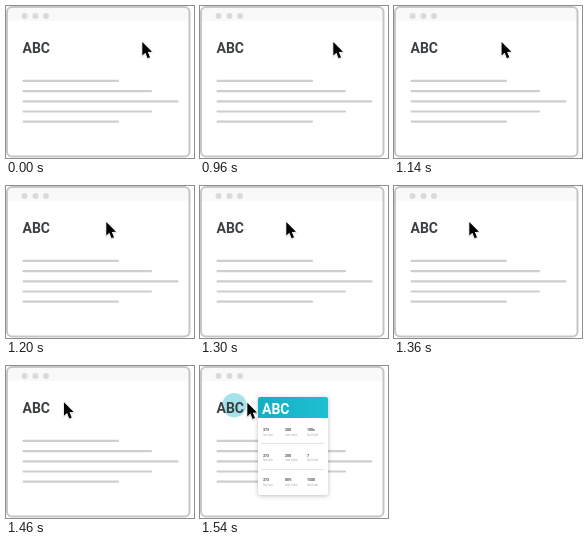
Write an HTML page with a canvas that moves like this. It is 188 px wide and 152 px high and loops after 2700 ms.

```html
<!DOCTYPE html>
<html lang="en">
<head>
<meta charset="utf-8">
<style>
  html, body { margin: 0; width: 100%; height: 100%; overflow: hidden; background: #fff; }
  canvas { display: block; width: 188px; height: 152px; }
</style>
</head>
<body>
<canvas id="stage"></canvas>
<script>
const W = 188, H = 152, LOOP = 2700, POPUP_AT = 1480;
const canvas = document.getElementById('stage');
const ctx = canvas.getContext('2d');
const dpr = window.devicePixelRatio || 1;
canvas.width = W * dpr;
canvas.height = H * dpr;

// Cursor tip: [time, x, y]
const path = [
  [940, 136, 36], [960, 133, 36], [1060, 117, 36], [1200, 100, 36],
  [1300, 86, 36], [1420, 64, 36], [1480, 54.5, 36.3], [1540, 47, 36.8]
];

function cursorAt(t) {
  if (t < 960) return path[0].slice(1);
  for (let i = 1; i < path.length; i++) {
    const [t0, x0, y0] = path[i - 1], [t1, x1, y1] = path[i];
    if (t <= t1) {
      const k = (t - t0) / (t1 - t0);
      return [x0 + (x1 - x0) * k, y0 + (y1 - y0) * k];
    }
  }
  return path[path.length - 1].slice(1);
}

function rounded(x, y, w, h, r) {
  ctx.beginPath();
  ctx.roundRect(x, y, w, h, r);
}

function disc(x, y, r, color) {
  ctx.fillStyle = color;
  ctx.beginPath();
  ctx.arc(x, y, r, 0, Math.PI * 2);
  ctx.fill();
}

function label(str, x, y, size, color, weight = 700) {
  ctx.font = `${weight} ${size}px Roboto, Arial, sans-serif`;
  ctx.fillStyle = color;
  ctx.fillText(str, x, y);
}

function drawWindow() {
  rounded(1, 1, 182.5, 149.5, 5);
  ctx.fillStyle = '#fff';
  ctx.fill();
  ctx.save();
  ctx.clip();
  ctx.fillStyle = '#f9f9f9';
  ctx.fillRect(0, 0, W, 15);
  ctx.restore();
  ctx.strokeStyle = '#c6c6c6';
  ctx.lineWidth = 2;
  ctx.stroke();
  for (const x of [18.5, 29.5, 40]) disc(x, 10, 3, '#dadada');
  ctx.fillStyle = '#cecece';
  [113, 146, 172.5, 146, 113].forEach((end, i) => {
    rounded(16.5, 73.8 + i * 10.2, end - 16.5, 2.2, 1);
    ctx.fill();
  });
}

function drawPopup() {
  ctx.save();
  ctx.shadowColor = 'rgba(0,0,0,.25)';
  ctx.shadowBlur = 4 * dpr;
  ctx.shadowOffsetY = dpr;
  rounded(58, 31, 70, 98, 2);
  ctx.fillStyle = '#fff';
  ctx.fill();
  ctx.restore();

  const teal = ctx.createLinearGradient(58, 0, 128, 0);
  teal.addColorStop(0, '#12b0c3');
  teal.addColorStop(1, '#1fc0d2');
  rounded(58, 31, 70, 21, [2, 2, 0, 0]);
  ctx.fillStyle = teal;
  ctx.fill();
  label('ABC', 62, 48.3, 14, '#fff');

  ctx.fillStyle = '#dedede';
  for (const y of [77, 103]) ctx.fillRect(61, y, 63, 0.8);
  const heads = [['373', '200', '100x'], ['373', '200', '7'], ['373', '80%', '1500']];
  const notes = ['low rate', 'new value', 'last total'];
  [65, 90.5, 115].forEach((y, row) => {
    [63, 85, 107].forEach((x, col) => {
      label(heads[row][col], x, y, 3.5, '#444');
      label(notes[col], x, y + 4.8, 2.8, '#aaa', 400);
    });
  });
}

function drawCursor(x, y) {
  ctx.save();
  ctx.translate(x, y);
  ctx.beginPath();
  ctx.moveTo(0.3, 0);
  for (const [px, py] of [[0.3, 13.6], [3.4, 10.8], [5.6, 16.2], [8, 15.2], [5.8, 10], [10, 9.8]]) {
    ctx.lineTo(px, py);
  }
  ctx.closePath();
  ctx.lineJoin = 'round';
  ctx.shadowColor = 'rgba(0,0,0,.25)';
  ctx.shadowBlur = dpr;
  ctx.shadowOffsetY = 0.5 * dpr;
  ctx.strokeStyle = '#fff';
  ctx.lineWidth = 1.4;
  ctx.stroke();
  ctx.shadowColor = 'transparent';
  ctx.fillStyle = '#000';
  ctx.fill();
  ctx.restore();
}

function draw(t) {
  const open = t >= POPUP_AT;
  ctx.setTransform(dpr, 0, 0, dpr, 0, 0);
  ctx.fillStyle = '#fff';
  ctx.fillRect(0, 0, W, H);
  drawWindow();
  if (open) disc(34.3, 39.2, 12.2, '#a6e2ea');
  label('ABC', 16.5, 46.7, 14, '#3c4043');
  if (open) drawPopup();
  drawCursor(...cursorAt(t));
}

const start = performance.now();
function tick() {
  const t = (performance.now() - start) % LOOP;
  draw(Math.floor(t / 20) * 20);
  requestAnimationFrame(tick);
}
tick();
</script>
</body>
</html>
```
